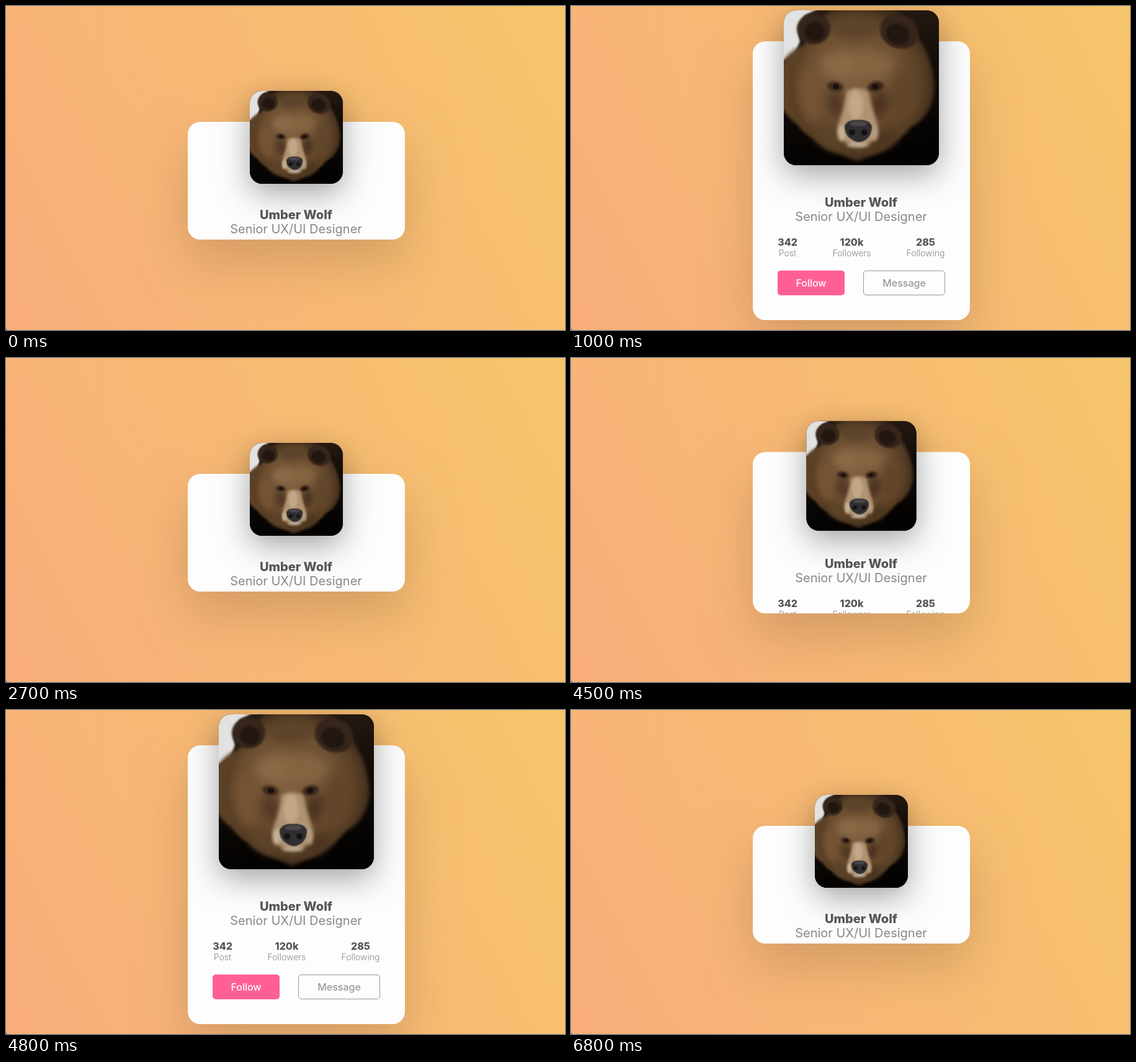
Recreate the animation shown at these times as an HTML page with a canvas. Size 901 px wide and 523 px high, loop 7700 ms.

```html
<!DOCTYPE html>
<html lang="en">
<head>
<meta charset="utf-8">
<title>Profile card</title>
<style>
  html, body { margin: 0; width: 100%; height: 100%; overflow: hidden; background: #f8ba74; }
  canvas { display: block; }
</style>
</head>
<body>
<canvas id="stage" width="901" height="523"></canvas>
<script>
const ctx = document.getElementById('stage').getContext('2d');
const W = 901, H = 523, CX = 468, CY = 282, LOOP = 7700;
const FONT = 'Inter, "Open Sans", sans-serif';

// Hover changes: start time, whether the card opens, time already elapsed at the first step
const moves = [
  { at: 700, open: true, lead: 55 },
  { at: 2500, open: false, lead: 91 },
  { at: 4500, open: true, lead: 55 },
  { at: 6600, open: false, lead: 91 }
];
const STEP = 100, DURATION = 290;

// CSS "ease": cubic-bezier(.25, .1, .25, 1)
function ease(x) {
  if (x >= 1) return 1;
  let lo = 0, hi = 1;
  for (let i = 0; i < 24; i++) {
    const s = (lo + hi) / 2;
    if (0.75 * s * (1 - s) + s ** 3 < x) lo = s; else hi = s;
  }
  const s = lo, r = 1 - s;
  return 0.3 * s * r * r + 3 * s * s * r + s ** 3;
}

function openness(t) {
  const move = moves.filter(m => m.at <= t).pop();
  if (!move) return 0;
  const elapsed = move.lead + Math.floor((t - move.at) / STEP) * STEP;
  const e = ease(elapsed / DURATION);
  return move.open ? e : 1 - e;
}

function roundRect(x, y, w, h, r) {
  ctx.beginPath();
  ctx.roundRect(x, y, w, h, r);
}

function shadowBox(x, y, w, h, color, dy, blur, alpha) {
  ctx.save();
  ctx.shadowColor = `rgba(0,0,0,${alpha})`;
  ctx.shadowOffsetY = dy;
  ctx.shadowBlur = blur;
  ctx.fillStyle = color;
  roundRect(x, y, w, h, 20);
  ctx.fill();
  ctx.restore();
}

function label(text, x, y, size, weight, color) {
  ctx.font = `${weight} ${size}px ${FONT}`;
  ctx.fillStyle = color;
  ctx.fillText(text, x, y);
}

// Portrait in a 250 unit square, painted once at double size
function paintPortrait() {
  const cv = document.createElement('canvas');
  cv.width = cv.height = 500;
  const g = cv.getContext('2d');
  g.scale(2, 2);

  const soft = px => { g.filter = px ? `blur(${px * 2}px)` : 'none'; };
  const oval = (x, y, rx, ry, color, turn = 0) => {
    g.fillStyle = color;
    g.beginPath();
    g.ellipse(x, y, rx, ry, turn, 0, Math.PI * 2);
    g.fill();
  };
  const shape = (path, color) => {
    g.fillStyle = color;
    g.fill(new Path2D(path));
  };

  const back = g.createLinearGradient(0, 0, 40, 250);
  back.addColorStop(0, '#2a1e14');
  back.addColorStop(0.5, '#120c08');
  back.addColorStop(1, '#040302');
  g.fillStyle = back;
  g.fillRect(0, 0, 250, 250);

  soft(1.5);
  shape('M-8 -8H66L34 8Q20 30 26 50L18 70L-8 86Z', '#e2e2e2');

  // Ruff and head
  soft(3);
  shape('M-8 92Q10 62 30 58L60 205Q36 206 22 184Q4 172 -8 150Z', '#5d4227');
  const fur = g.createRadialGradient(112, 98, 15, 118, 120, 130);
  fur.addColorStop(0, '#80603f');
  fur.addColorStop(0.55, '#6e5032');
  fur.addColorStop(0.85, '#523a22');
  fur.addColorStop(1, '#38271a');
  shape('M48 38Q62 2 90 -8H160Q196 2 212 38Q240 72 243 125Q240 170 206 188' +
        'Q178 220 150 232L118 244L88 232Q54 222 32 190Q6 150 10 105Q20 62 48 38Z', fur);

  // Ears
  soft(1.5);
  oval(48, 30, 27, 25, '#35251a');
  oval(50, 34, 16, 15, '#211710');
  oval(186, 34, 32, 27, '#35251a', 0.4);
  oval(184, 38, 19, 16, '#211710', 0.4);

  // Lights and shades of the face
  soft(8);
  oval(116, 30, 36, 16, '#5c432b');
  oval(92, 88, 32, 20, '#896a47');
  oval(144, 88, 32, 20, '#836542');
  oval(45, 138, 19, 42, '#755434', -0.1);
  oval(192, 135, 21, 43, '#62462b', 0.1);
  oval(84, 152, 15, 25, '#523924', -0.25);
  oval(154, 152, 15, 25, '#4b3320', 0.25);
  oval(76, 205, 24, 16, '#5c4228', 0.5);
  oval(159, 208, 22, 15, '#4c3520', -0.5);

  // Muzzle
  soft(3);
  shape('M101 130Q118 122 136 130Q142 157 150 180Q153 203 139 214' +
        'Q120 224 99 213Q84 203 89 180Q98 155 101 130Z', '#b09373');
  oval(116, 153, 12, 24, '#c2a888');
  oval(93, 198, 6, 13, '#c9b395');
  oval(146, 198, 6, 13, '#b59c7e');
  oval(119, 217, 18, 4, '#c0b09a');

  // Eyes, nose and mouth
  soft(2);
  oval(83, 123, 13, 8, '#3e2a1c', 0.2);
  oval(148, 123, 13, 8, '#392619', -0.2);
  soft(0.6);
  oval(84, 123, 5, 4.5, '#17100d');
  oval(147, 123, 5, 4.5, '#17100d');
  soft(0.8);
  shape('M98 187Q102 176 120 177Q138 176 142 187Q142 202 132 209' +
        'Q120 217 109 208Q98 202 98 187Z', '#302e30');
  oval(120, 183, 14, 4, '#4b484c');
  oval(110, 197, 5, 5, '#121113');
  oval(130, 197, 5, 5, '#121113');
  return cv;
}

function paintBackdrop() {
  const a = 62 * Math.PI / 180, dx = Math.sin(a), dy = -Math.cos(a);
  const half = CX * Math.abs(dx) + CY * Math.abs(dy);
  const grad = ctx.createLinearGradient(CX - dx * half, CY - dy * half, CX + dx * half, CY + dy * half);
  grad.addColorStop(0, '#f9ad7c');
  grad.addColorStop(1, '#f7c66b');
  ctx.fillStyle = grad;
  ctx.fillRect(0, 0, W, H);
  ctx.fillStyle = '#6b5a4c';
  ctx.beginPath();
  ctx.moveTo(0, H - 4);
  ctx.quadraticCurveTo(0, H, 4, H);
  ctx.lineTo(0, H);
  ctx.fill();
}

function paintDetails(y) {
  ctx.textAlign = 'center';
  label('Umber Wolf', CX - 0.5, y, 20, 800, '#555');
  label('Senior UX/UI Designer', CX - 0.5, y + 23, 20, 400, '#888');

  const stats = [['342', 'Post', 349], ['120k', 'Followers', 452.5], ['285', 'Following', 571.5]];
  for (const [count, name, x] of stats) {
    label(count, x, y + 63, 16, 800, '#555');
    label(name, x, y + 80, 14, 300, '#888');
  }

  ctx.fillStyle = '#ff5f95';
  roundRect(333, y + 103, 108, 40, 5);
  ctx.fill();
  label('Follow', 387, y + 129, 16, 500, '#fff');
  ctx.strokeStyle = '#999';
  ctx.lineWidth = 1;
  roundRect(471.5, y + 103.5, 131, 39, 4.5);
  ctx.stroke();
  label('Message', 537, y + 129, 16, 500, '#999');
}

const portrait = paintPortrait();

function draw(t) {
  const p = openness(t);
  const height = 190 + 260 * p, top = CY - height / 2;
  const side = 150 + 100 * p, px = CX - side / 2, py = top - 50;

  paintBackdrop();
  shadowBox(293, top, 350, height, '#fdfdfd', 35, 80, 0.15);
  shadowBox(px, py, side, side, '#0a0705', 15, 50, 0.35);

  ctx.save();
  roundRect(px, py, side, side, 20);
  ctx.clip();
  ctx.imageSmoothingQuality = 'high';
  ctx.drawImage(portrait, px, py, side, side);
  ctx.restore();

  ctx.save();
  roundRect(293, top, 350, height, 20);
  ctx.clip();
  paintDetails(344 - 20 * p);
  ctx.restore();
}

const start = performance.now();
function tick() {
  draw((performance.now() - start) % LOOP);
  requestAnimationFrame(tick);
}
tick();
</script>
</body>
</html>
```
